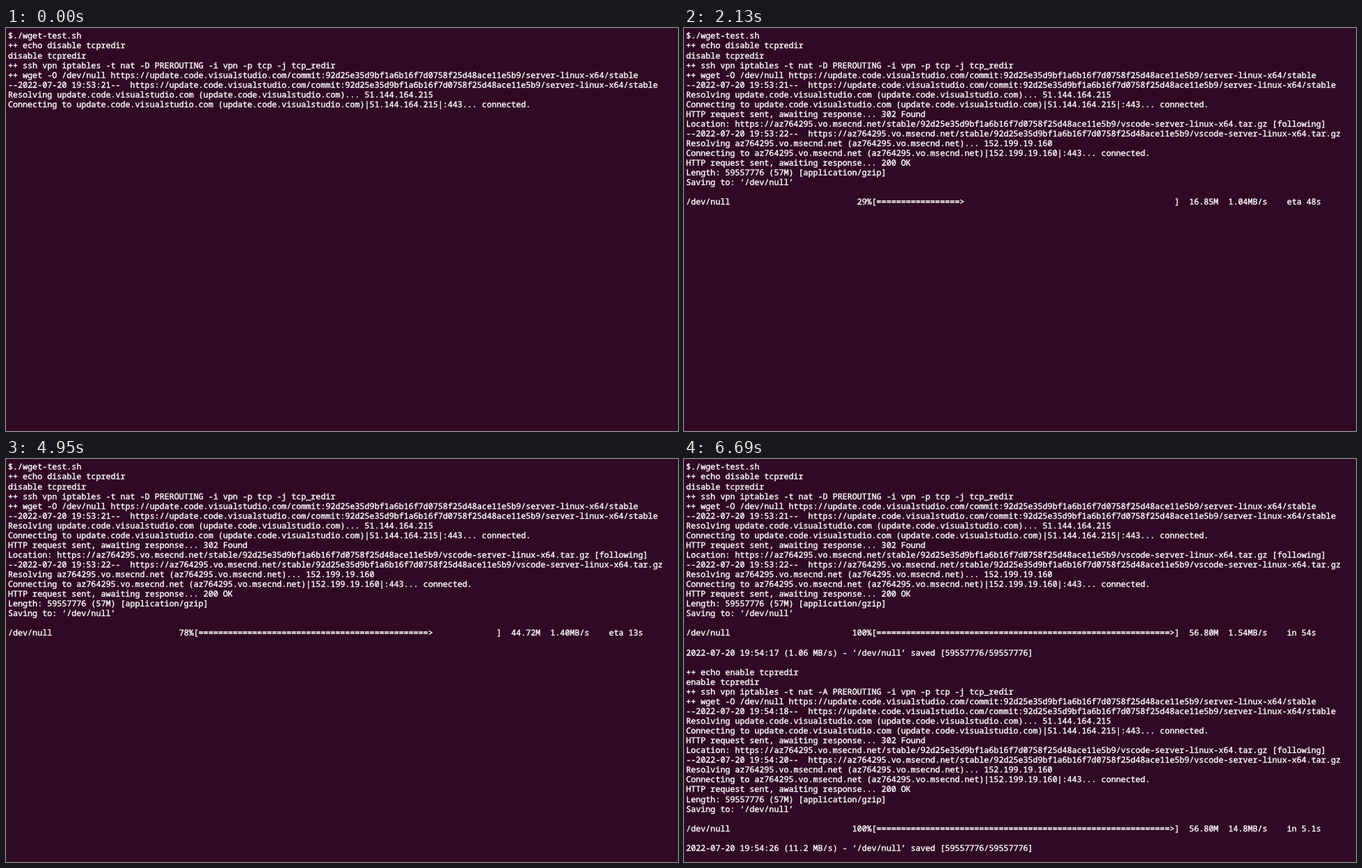
Write an HTML page that moves like this. It is 966 px wide and 580 px high and loops after 8000 ms.

```html
<!DOCTYPE html>
<html lang="en">
<head>
<meta charset="utf-8">
<title>wget test</title>
<style>
  html, body { margin: 0; width: 100%; height: 100%; overflow: hidden; background: #300a24; }
  pre {
    margin: 0; padding: 4.4px 0 0 3px; color: #fff;
    font: 500 11.71875px/14.0625px "Noto Sans Mono", "DejaVu Sans Mono", monospace;
    -webkit-text-stroke: 0.4px #fff;
    text-rendering: geometricPrecision; font-variant-ligatures: none;
  }
</style>
</head>
<body>
<pre id="screen"></pre>
<script>
const LOOP = 8000, STEP = 30, TOTAL = 56.8, BAR = 61;
const HASH = '92d25e35d9bf1a6b16f7d0758f25d48ace11e5b9';
const CODE = 'update.code.visualstudio.com', CDN = 'az764295.vo.msecnd.net';
const URL1 = `https://${CODE}/commit:${HASH}/server-linux-x64/stable`;
const URL2 = `https://${CDN}/stable/${HASH}/vscode-server-linux-x64.tar.gz`;
const SENT = 'HTTP request sent, awaiting response... ';
const screen = document.getElementById('screen');

// Each key: time, megabytes loaded, MB/s, seconds left
const runs = [
  {
    verb: 'disable', flag: '-D', began: '19:53:21', moved: '19:53:22', ended: '19:54:17',
    rate: '1.06', took: '54s', echo: 0, ssh: 0, wget: 0, sent: 30, found: 60, joined: 90, ok: 120,
    keys: [[150, 0.05, 0.2, 400], [500, 1, 0.38, 279], [900, 2.7, 0.52, 172], [1230, 6.19, 1.19, 116],
      [1620, 11.7, 1.42, 64], [2130, 16.85, 1.04, 48], [3480, 27.73, 0.9815, 34],
      [4230, 36.21, 1.36, 22], [5670, 53.23, 1.44, 4], [5910, TOTAL, 1.54, 1]]
  },
  {
    verb: 'enable', flag: '-A', began: '19:54:18', moved: '19:54:20', ended: '19:54:26',
    rate: '11.2', took: '5.1s', echo: 5910, ssh: 5940, wget: 6000, sent: 6030, found: 6060, joined: 6090, ok: 6120,
    keys: [[6150, 0.4, 1.5, 9], [6300, 9, 7, 5], [6480, 30.5, 12.6, 2], [6690, TOTAL, 14.8, 1]]
  }
];

function sample(keys, t) {
  const i = keys.findIndex(k => k[0] > t);
  if (i < 0) return keys[keys.length - 1].slice(1);
  const a = keys[i - 1], b = keys[i], p = (t - a[0]) / (b[0] - a[0]);
  return a.slice(1).map((v, j) => v + (b[j + 1] - v) * p);
}

function sizeText(mb) {
  return (mb < 1 ? (mb * 1024).toFixed(2) + 'K' : mb.toFixed(2) + 'M').padStart(8);
}

function speedText(mb) {
  const [n, unit] = mb < 1 ? [mb * 1024, 'KB/s'] : [mb, 'MB/s'];
  return n.toFixed(n > 99.95 ? 0 : n < 9.995 ? 2 : 1).padStart(4) + unit;
}

function etaText(s) {
  s = Math.round(s);
  return 'eta ' + (s < 100 ? s + 's' : `${Math.floor(s / 60)}m ${s % 60}s`);
}

function progress(run, t) {
  const [mb, speed, left] = sample(run.keys, t);
  const part = mb / TOTAL, start = run.keys[0][0];
  const percent = String(Math.floor(part * 100)).padStart(3);
  const filled = Math.floor(part * BAR);
  const bar = (filled ? '='.repeat(filled - 1) + '>' : '').padEnd(BAR);
  const tail = part === 1 ? 'in ' + run.took : t - start >= 330 ? etaText(left) : '';
  return `${'/dev/null'.padEnd(34)}${percent}%[${bar}]${sizeText(mb)}  ${speedText(speed)}    ${tail}`;
}

function log(run, t) {
  const out = [], start = run.keys[0][0], end = run.keys[run.keys.length - 1][0];
  const add = (at, ...lines) => { if (t >= at) out.push(...lines); };
  add(run.echo, `++ echo ${run.verb} tcpredir`, `${run.verb} tcpredir`);
  add(run.ssh, `++ ssh vpn iptables -t nat ${run.flag} PREROUTING -i vpn -p tcp -j tcp_redir`);
  add(run.wget,
    `++ wget -O /dev/null ${URL1}`,
    `--2022-07-20 ${run.began}--  ${URL1}`,
    `Resolving ${CODE} (${CODE})... 51.144.164.215`,
    `Connecting to ${CODE} (${CODE})|51.144.164.215|:443... connected.`);
  add(run.sent, SENT + (t >= run.found ? '302 Found' : ''));
  add(run.found,
    `Location: ${URL2} [following]`,
    `--2022-07-20 ${run.moved}--  ${URL2}`,
    `Resolving ${CDN} (${CDN})... 152.199.19.160`);
  add(run.joined, `Connecting to ${CDN} (${CDN})|152.199.19.160|:443... connected.`);
  add(run.ok, SENT + '200 OK', 'Length: 59557776 (57M) [application/gzip]', 'Saving to: ‘/dev/null’', '');
  if (t >= start) out.push(progress(run, t));
  add(end, '', `2022-07-20 ${run.ended} (${run.rate} MB/s) - ‘/dev/null’ saved [59557776/59557776]`, '');
  return out;
}

function draw() {
  const t = Math.floor(performance.now() % LOOP / STEP) * STEP;
  const text = ['$./wget-test.sh', ...runs.flatMap(run => log(run, t))].join('\n');
  if (screen.textContent !== text) screen.textContent = text;
  requestAnimationFrame(draw);
}
draw();
</script>
</body>
</html>
```
